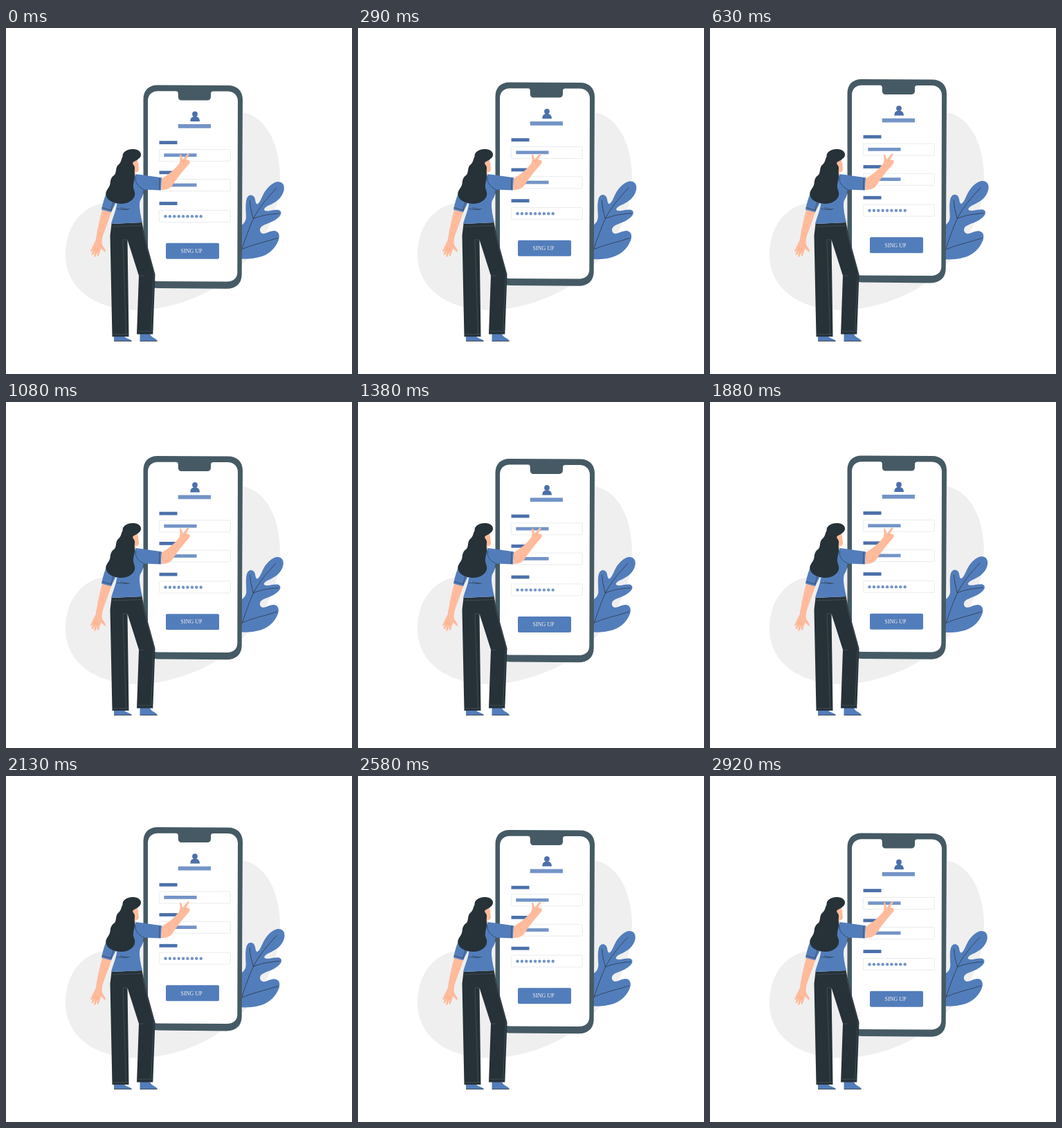
An HTML page with a canvas for the animation above (2960 ms loop, 500 by 500 pixels).

```html
<!DOCTYPE html>
<html lang="en">
<head>
<meta charset="utf-8">
<title>Sign up</title>
<style>
html, body { margin: 0; width: 100%; height: 100%; overflow: hidden; background: #fff; }
canvas { display: block; width: 100vw; height: 100vh; }
</style>
</head>
<body>
<canvas id="stage"></canvas>
<script>
const SIZE = 500, LOOP = 2960, FPS = 24, CYCLE = 36;
const C = {
  blue: '#527dbb', mid: '#7394c7', deep: '#4b70ab', ink: '#263238',
  skin: '#ffbb9b', frame: '#455a64', blob: '#efefef', seam: '#56636a', rule: '#e4e6e8'
};
const canvas = document.getElementById('stage');
const ctx = canvas.getContext('2d');
const dpr = window.devicePixelRatio || 1;
canvas.width = canvas.height = SIZE * dpr;

const fill = (d, color) => {
  ctx.fillStyle = color;
  ctx.fill(new Path2D(d));
};
const line = (d, color, width = 0.7) => {
  ctx.strokeStyle = color;
  ctx.lineWidth = width;
  ctx.stroke(new Path2D(d));
};
const bar = (x, y, w, h, color) => {
  ctx.fillStyle = color;
  ctx.fillRect(x, y, w, h);
};
const disc = (x, y, r, color) => {
  ctx.fillStyle = color;
  ctx.beginPath();
  ctx.arc(x, y, r, 0, 7);
  ctx.fill();
};
const box = (x, y, w, h, r) => {
  ctx.beginPath();
  ctx.roundRect(x, y, w, h, r);
};

// Piecewise linear value through [position, value] stops
function tween(stops, p) {
  const i = stops.findIndex(s => s[0] > p);
  const [a, u] = stops[i - 1], [b, v] = stops[i];
  return u + (v - u) * (p - a) / (b - a);
}
const BEAT = [[0, 1], [0.1, 1.1], [0.3, 1], [0.4, 1], [0.5, 1.1], [0.6, 1], [1, 1]];
const FLOAT = [[0, 0], [0.5, -10], [1, 0]];

function drawBlob() {
  fill('M342 122C376 128 396 168 396 216C396 268 370 328 302 375C270 394 228 408 186 407.5' +
    'C126 406 86 374 86 328C86 288 108 258 142 253C182 250 208 240 215 200C225 140 280 110 342 122Z', C.blob);
}

function drawLeaf(scale) {
  ctx.save();
  ctx.translate(361, 290);
  ctx.scale(scale, scale);
  ctx.translate(-361, -290);
  fill('M328 330C330 310 332 294 340 286C345 282 347.500 279 347.300 272C347 264 346 254 348.500 247' +
    'C351 242 356 241.500 359 246C361 250 360 255 363 255.500C367 254 369 246 373 239' +
    'C378 231 385 225 391 224C398 223.500 402 228 400.500 236C398 247 389 253 380 257' +
    'C375 259 372 262 373 264C376 267 386 263 392 263.500C397 264 398 269 394 273' +
    'C387 281 374 283 369 287C365 291 367 296 371 297C376 297 381 293 387 293' +
    'C394 294 395 300 393 306C388 319 378 327 366 330C356 333 338 334 328 330Z', C.blue);
  line('M338 327L342 317C347 302 352 288 357.500 276C365 261 377 247 390 233' +
    'M357.500 276C355 267 353 259 352.500 250M357.500 276C369 271 382 269.500 394 268.500' +
    'M341 319C357 312 374 309 392 303', C.ink);
  ctx.restore();
}

function drawField(y, label) {
  bar(221.5, label, 26, 4.8, C.deep);
  box(221.3, y, 103, 17, 1.5);
  ctx.strokeStyle = C.rule;
  ctx.lineWidth = 0.8;
  ctx.stroke();
}

function drawPhone(dy) {
  ctx.save();
  ctx.translate(0, dy);
  fill('M219 83L321 83.500C334 83.500 342 91.500 342 104L340.700 357C340.500 370 332 377.300 319 377.300' +
    'L219 376.500C206 376.500 198.500 368 198.500 356V103.500C198.500 91 206 83 219 83Z', C.frame);
  fill('M219 91.700H245C248 91.700 248.800 93 248.800 96V99.500C248.800 103 250.500 105 254 105' +
    'H290.500C294 105 296 103 296 99.700V96C296 93 297 92 300 92H320C329 92 335 98 335 106' +
    'L334.300 354C334.200 362 328 367 320 367L219 366.500C210 366.500 205 361 205 353V106C205 97 211 91.700 219 91.700Z', '#fff');

  disc(273, 125, 3.9, C.deep);
  fill('M266.300 135.500C266.500 130 269 128.500 273 128.500C277 128.500 279.700 130 280 135.500Z', C.deep);
  bar(248.7, 139.5, 47.3, 5.8, C.mid);

  drawField(176, 163.7);
  drawField(219.2, 207);
  drawField(264, 251.7);
  bar(228.3, 181.9, 47.2, 4.8, C.mid);
  bar(228.3, 225.1, 47.2, 4.8, C.mid);
  for (let i = 0; i < 9; i++) disc(230.5 + i * 6.4, 272.7, 2.2, C.mid);

  box(231, 311.2, 77, 23, 2);
  ctx.fillStyle = C.blue;
  ctx.fill();
  ctx.fillStyle = '#f6f3ea';
  ctx.font = '8px "Liberation Serif", "Times New Roman", serif';
  ctx.textAlign = 'center';
  ctx.fillText('SING UP', 268, 325.4);
  ctx.restore();
}

function drawWoman() {
  // Shoes
  fill('M156 445H170C173 449 180 449 182 452.500H156Z', C.blue);
  fill('M193.500 442H208C210 448 217 448 219 452.500H193.500Z', C.blue);
  line('M156 452.500H181.500M193.500 452.500H218.500', C.ink, 0.8);

  // Far arm
  fill('M139.500 261L152.500 265C148 279 143 291 139.500 302C138.500 308 138 311 139.500 314' +
    'L144 321.500C144.500 323.500 142.500 324 141.500 322.500L137.500 318.500L134 328.500C133.500 330.500 131.500 330.300 131.700 328.500' +
    'L132.500 323L129.500 330C128.700 331.500 127 331 127.200 329.500L128.500 322.500L126 327.500' +
    'C125 328.800 123.500 328 123.800 326.500L125.500 321L123.500 323.500C122 324 122 322.500 122.500 321.500' +
    'C125 316 127 312 129.500 307C132 292 135 276 139.500 261Z', C.skin);
  line('M127.500 322L129 317M131.800 323L132.500 318', '#e99a7d', 0.5);

  // Trousers
  fill('M152.500 283L196.500 281C199 293 201 303 204 314L215.500 356L212.300 442.500H189L192 358' +
    'L175.500 306L177.500 446H153.500L150.500 300Z', C.ink);
  line('M175.500 306L169 306M169 306L173.500 443M154 442.800H177M189.500 438.300H212' +
    'M197 291C202 312 208 334 213.500 353L209.500 438M192 358L200 358M153 287L197 285.500', C.seam, 0.5);

  // Shirt
  fill('M154 226C145 234 141 248 138 262.500L152 266.300L160 250Z', C.blue);
  line('M138.500 259.500L153 263.500M155 251L152 263', C.ink, 0.6);
  fill('M181 211C191 211 198 212.500 205 213.500L225 216.300L224 234.500L199.500 233.500C198.500 239 197.500 244 194 249' +
    'C191.500 256 194 268 197 281L152 283C155 272 159 263 160 255L170 225Z', C.blue);
  line('M187 215C186 223 191 230 199.500 233.500M199.500 233.500L198 240M222 217L221.500 234' +
    'M160 261C167 263 173 263 179 261.500M165 260L176 262', C.ink, 0.6);

  // Pointing arm
  fill('M225 217.500C235 212 243 205 249.500 197C252.500 193 251.500 187 251 184' +
    'C251 182.500 253 182.300 253.500 184L255.500 190L262.300 181.800C263.500 180.500 265.300 181.500 264.500 183' +
    'L260 190.300L264.500 191C266.200 192 266 195 264.500 196.500C256 206 248 216 240 228' +
    'C236 233 231 234 224.300 234Z', C.skin);
  line('M260 190.300L257 194', '#e99a7d', 0.5);

  // Face, neck and hair
  fill('M180 191L189 189.500C191 192 191.500 197 192 204C192 207 190 208.500 187 208.500L187 213C183 215 177 213 176 208Z', C.skin);
  fill('M168.500 186C168 179 175 175 183 175C190 174.500 196 179 195 184C194 189 187 192 183.500 194' +
    'C182 198 187 198 186 204C185 209 187 214 185.500 219C184 225 183 229 185 234' +
    'C189 243 183 250 174 253C163 256 148 252 145 243C142 235 149 233 150.500 225' +
    'C151 218 153 215 157 212C160 208 158 202 162 198C167 194 166 190 168.500 186Z', C.ink);
}

function draw(now) {
  const t = now % LOOP;
  const step = Math.floor((t + 4) * FPS / 1000) % 71;
  const phase = (step + 1) % CYCLE / CYCLE;
  ctx.setTransform(dpr, 0, 0, dpr, 0, 0);
  ctx.fillStyle = '#fff';
  ctx.fillRect(0, 0, SIZE, SIZE);
  drawBlob();
  drawLeaf(tween(BEAT, phase));
  drawPhone(tween(FLOAT, phase));
  drawWoman();
}

const start = performance.now();
function tick() {
  draw(performance.now() - start);
  requestAnimationFrame(tick);
}
tick();
</script>
</body>
</html>
```
